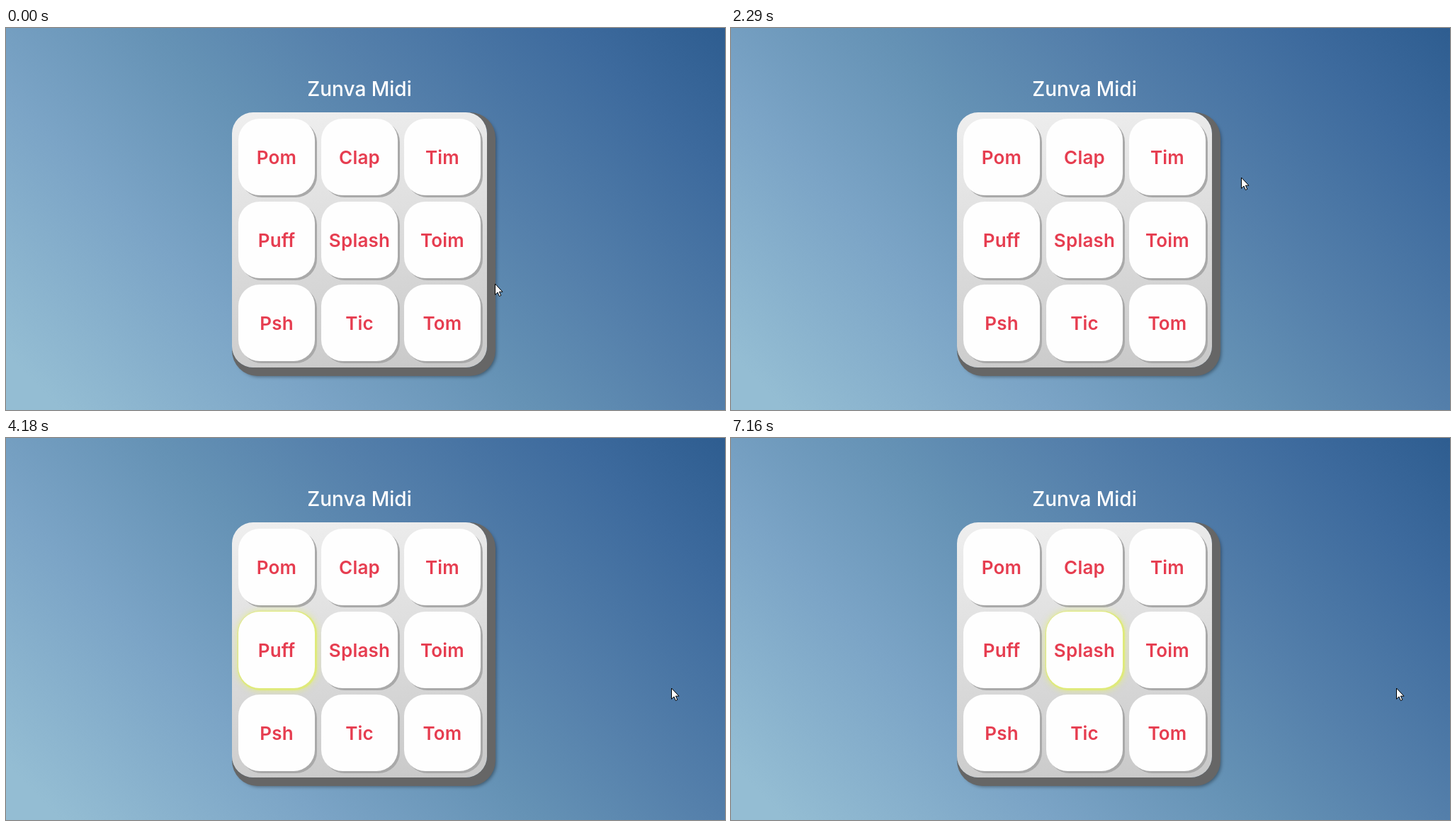
These frames come from a looping animation (1015 px wide and 539 px high, 8000 ms). An HTML page:

```html
<!DOCTYPE html>
<html lang="pt">
<head>
<meta charset="utf-8">
<title>Drum pad</title>
<style>
  html, body { margin: 0; width: 100%; height: 100%; overflow: hidden; }
  body {
    position: relative;
    font-family: Inter, "Open Sans", sans-serif;
    background: linear-gradient(45deg, #94bdd3 5%, #7ba4c6 29%, #6592b5 48%, #5580ab 64%, #3d6a9d 86%, #2e5d90);
  }
  h1 {
    position: absolute; left: 319px; top: 66px; width: 360px; margin: 0;
    font-size: 28px; font-weight: 500; line-height: 40px;
    text-align: center; color: #fff;
  }
  #board {
    position: absolute; left: 319px; top: 119px; padding: 9px;
    display: grid; grid-template: repeat(3, 108px) / repeat(3, 108px); gap: 9px;
    border-radius: 30px;
    background: linear-gradient(172deg, #efefef, #c8c8c8);
    box-shadow: 6px 6px 0 6px #666, 9px 9px 5px 4px rgba(0, 0, 0, .4);
  }
  .key {
    display: flex; align-items: center; justify-content: center;
    border-radius: 30px; background: #fefefe; color: #e63d50;
    font-size: 26px; font-weight: 600; letter-spacing: .2px;
    box-shadow: 3px 3px 0 #a9a9a9;
  }
  .focus {
    --glow: 1px 1px 1px 2px #dfea7a, 1px 1px 8px 3px rgba(226, 238, 120, .7);
    box-shadow: var(--glow);
  }
  .clicked { --glow: 0 0 2px 2px #e8f560, 0 0 8px 4px rgba(232, 245, 96, .8); }
  .pressed {
    box-sizing: border-box; border: 3px solid #e93e50; padding-top: 6px;
    background: #e93e50; color: #fff;
    box-shadow: inset 3px 3px 0 #b4313f, var(--glow);
  }
  svg { position: absolute; left: 0; top: 0; overflow: hidden; }
  path { fill: #fff; stroke: #000; stroke-linejoin: round; }
</style>
</head>
<body>
<h1>Zunva Midi</h1>
<div id="board"></div>
<svg width="1015" height="539">
  <g id="pointer">
    <circle id="spot" r="13" cy="1" fill="#ffe600" fill-opacity=".6"/>
    <path id="arrow" d="M.5 1V16.3L4 13 6.4 18.5 8.8 17.4 6.4 12.2H11Z"/>
    <path id="hand" d="M-1.5 14.5V2Q0-1 1.5 2V8.3Q4 7 4.5 9 7 8 7.4 10 10.5 9.5 10.5 12.5V16L8.5 20.5V23.5H.5V21.5L-6 14.5Q-6-12-1.5 14.5ZM1.5 8.3V12M4.5 9V12.5M7.4 10V13"/>
  </g>
</svg>
<script>
  const LOOP = 8000, TICK = 70;
  const $ = id => document.getElementById(id);
  const show = (element, visible) => { element.style.display = visible ? '' : 'none'; };

  const keys = 'Pom Clap Tim Puff Splash Toim Psh Tic Tom'.split(' ').map(label => {
    const key = document.createElement('div');
    key.textContent = label;
    $('board').append(key);
    return key;
  });

  // Each move eases on from where the last one stopped
  const moves = [
    { start: 70, end: 70, to: [641, 261] },
    { start: 230, end: 300, to: [760, 269] },
    { start: 370, end: 370, to: [1020, 298] },
    { start: 640, end: 1130, to: [949, 294] },
    { start: 1330, end: 1470, to: [907, 294] },
    { start: 1870, end: 2500, to: [669, 187] },
    { start: 2850, end: 3190, to: [939, 352] }
  ];

  // When a key takes the focus, and when it is struck
  const focuses = [
    { start: 2780, label: 'Tim', hold: 70, hits: [2780, 3450] },
    { start: 4180, label: 'Puff', hold: 130, hits: [4580] },
    { start: 5310, label: 'Splash', hold: 130, hits: [5640, 7030] }
  ];

  function pointerAt(t) {
    let point = [690, 360];
    for (const { start, end, to } of moves) {
      if (t < start) break;
      const steps = Math.round((end - start) / TICK) + 1;
      const p = Math.min(1, (Math.floor((t - start) / TICK) + 1) / steps);
      const eased = p * p * (3 - 2 * p);
      point = point.map((v, i) => Math.round(v + (to[i] - v) * eased));
    }
    return point;
  }

  function draw(now) {
    const t = now % LOOP;
    const focus = focuses.findLast(f => f.start <= t);
    const hit = focus?.hits.find(at => t >= at && t < at + focus.hold);
    const clicking = hit !== undefined && hit === moves.at(-1).start - TICK;

    for (const key of keys) {
      const active = key.textContent === focus?.label;
      key.className = 'key';
      key.classList.toggle('focus', active);
      key.classList.toggle('pressed', active && hit !== undefined);
      key.classList.toggle('clicked', active && clicking);
    }

    const [x, y] = pointerAt(t);
    const overKey = x >= 562 && x < 670;
    $('pointer').setAttribute('transform', `translate(${x} ${y})`);
    show($('hand'), overKey);
    show($('arrow'), !overKey);
    show($('spot'), clicking);
    requestAnimationFrame(draw);
  }
  draw(0);
</script>
</body>
</html>
```
